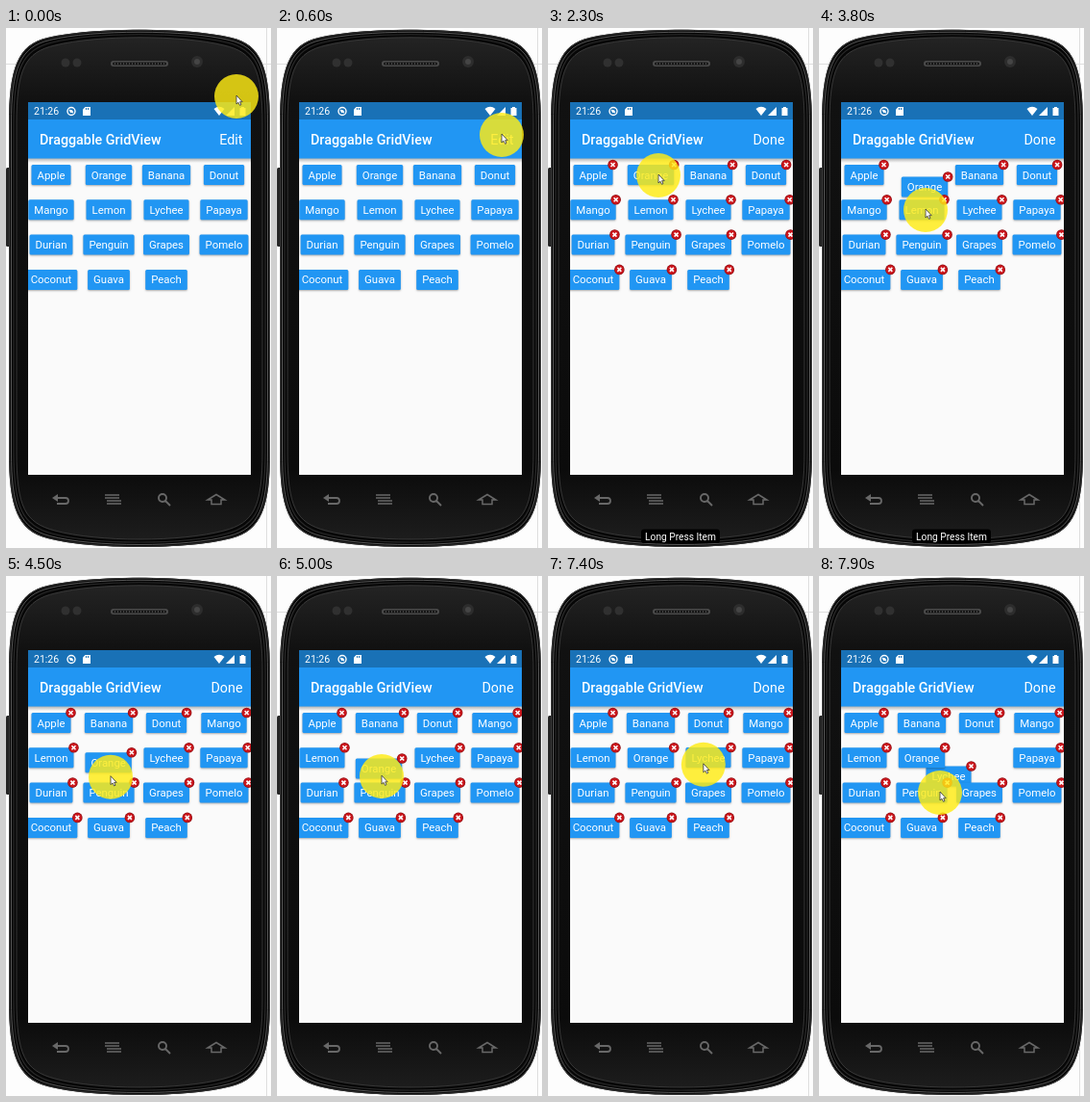
Recreate the animation shown at these times as an HTML page with a canvas. Size 276 by 540 pixels, loop 8 s.

```html
<!DOCTYPE html>
<html lang="en">
<head>
<meta charset="utf-8">
<title>Draggable GridView</title>
<style>
html, body { margin: 0; width: 100%; height: 100%; overflow: hidden; background: #fdfdfd; }
canvas { display: block; width: 276px; height: 540px; }
</style>
</head>
<body>
<canvas id="stage"></canvas>
<script>
const W = 276, H = 540, LOOP = 8000, STEP = 100;
const canvas = document.getElementById('stage');
const ctx = canvas.getContext('2d');
const dpr = window.devicePixelRatio || 1;
canvas.width = W * dpr;
canvas.height = H * dpr;

const BLUE = '#2196f3';
const fruits = ['Apple', 'Orange', 'Banana', 'Donut', 'Mango', 'Lemon', 'Lychee', 'Papaya',
  'Durian', 'Penguin', 'Grapes', 'Pomelo', 'Coconut', 'Guava', 'Peach'];
const reordered = fruits.filter(name => name !== 'Orange');
reordered.splice(5, 0, 'Orange');

// Motion paths: [time, x, y]
const pointerPath = [
  [0, 240, 71], [200, 205, 180], [300, 198, 207], [600, 234, 111], [1200, 234, 111],
  [1500, 193, 149], [2100, 173, 152], [2200, 113, 157], [2300, 115, 153], [3300, 115, 153],
  [3800, 111, 189], [4200, 109, 209], [5100, 109, 208], [5900, 169, 192], [6000, 171, 192],
  [6300, 153, 194], [6500, 153, 194], [6700, 169, 190], [7300, 169, 190], [7900, 126, 225]
];
const drags = [
  { name: 'Orange', from: 3400, to: 5200,
    path: [[3400, 107, 152.5], [3800, 110, 165], [4200, 107, 190], [5000, 106, 200]] },
  { name: 'Lychee', from: 7400, to: LOOP,
    path: [[7400, 167, 188.5], [7600, 158, 193], [7900, 135, 208]] }
];

function along(path, t) {
  const next = path.findIndex(key => key[0] > t);
  if (next === 0) return path[0].slice(1);
  if (next < 0) return path[path.length - 1].slice(1);
  const a = path[next - 1], b = path[next];
  const k = (t - a[0]) / (b[0] - a[0]);
  return [a[1] + (b[1] - a[1]) * k, a[2] + (b[2] - a[2]) * k];
}

function rect(x, y, w, h, fill, radius = 0) {
  ctx.fillStyle = fill;
  ctx.beginPath();
  ctx.roundRect(x, y, w, h, radius);
  ctx.fill();
}

function disc(x, y, r, fill) {
  ctx.fillStyle = fill;
  ctx.beginPath();
  ctx.arc(x, y, r, 0, Math.PI * 2);
  ctx.fill();
}

function shape(d, fill) {
  ctx.fillStyle = fill;
  ctx.fill(new Path2D(d));
}

function line(d, color, width) {
  ctx.strokeStyle = color;
  ctx.lineWidth = width;
  ctx.stroke(new Path2D(d));
}

function label(text, x, y, size, align = 'left', weight = 400) {
  ctx.font = `${weight} ${size}px Roboto, sans-serif`;
  ctx.textAlign = align;
  ctx.fillStyle = '#fff';
  ctx.fillText(text, x, y);
}

// Phone outline, drawn in by `inset` pixels
function outline(inset) {
  const l = 3 + inset, r = 275 - inset, t = 2 + inset, b = 539 - inset;
  return `M${l} 100C${l} 42 ${l + 9} ${t + 15} ${l + 40} ${t + 8}` +
    `C${l + 85} ${t - 3} ${r - 85} ${t - 3} ${r - 40} ${t + 8}` +
    `C${r - 9} ${t + 15} ${r} 42 ${r} 100V440` +
    `C${r} 498 ${r - 9} ${b - 17} ${r - 40} ${b - 9}` +
    `C${r - 85} ${b + 3} ${l + 85} ${b + 3} ${l + 40} ${b - 9}` +
    `C${l + 9} ${b - 17} ${l} 498 ${l} 440Z`;
}

function drawPhone() {
  rect(0, 0, W, H, '#fdfdfd');
  rect(0, 37, W, 1, '#dedede');
  rect(271, 0, 1, H, '#dedede');
  rect(0, 145, 5, 82, '#242424', 1.5);
  shape(outline(0), '#070707');
  line(outline(0.5), '#3c3c3c', 1);
  line(outline(2.5), '#777', 0.7);
  line(outline(5), '#292929', 1.2);
  const gloss = ctx.createLinearGradient(0, 8, 0, 532);
  gloss.addColorStop(0, '#242424');
  gloss.addColorStop(0.13, '#111');
  gloss.addColorStop(0.86, '#0b0b0b');
  gloss.addColorStop(1, '#1d1d1d');
  shape(outline(8), gloss);
  line(outline(8), '#484848', 0.7);

  rect(109, 34, 60, 6, '#4b4b4b', 3);
  rect(111, 35.5, 56, 3, '#171717', 1.5);
  for (let x = 113; x < 166; x += 3) rect(x, 36, 1, 2, '#444');
  disc(62, 36, 4.5, '#303030');
  disc(74, 36, 4.5, '#303030');
  disc(199, 35, 6, '#2d2d2d');
  disc(199, 35, 3, '#454545');

  const gray = '#686868';
  line('M52 488H62Q65 488 65 491T62 494H53', gray, 1.8);
  shape('M48 488L54 484V492Z', gray);
  line('M103 485H118M103 488H118M105 491H120M105 494H120', gray, 1.4);
  line('M167 488A4 4 0 1 1 159 488A4 4 0 1 1 167 488M166 491L171 496', gray, 1.9);
  line('M210 490L219 484.5L228 490H224V494.5H214V490Z', gray, 1.5);
}

function drawAppBar(editing) {
  rect(23, 77, 232, 387, '#fafafa');
  const shadow = ctx.createLinearGradient(0, 135, 0, 140);
  shadow.addColorStop(0, 'rgba(0,0,0,.3)');
  shadow.addColorStop(1, 'rgba(0,0,0,0)');
  rect(23, 135, 232, 5, shadow);
  rect(23, 77, 232, 18, '#1971b6');
  rect(23, 95, 232, 40.5, BLUE);

  label('21:26', 29, 90, 10.5);
  line('M72 86.5A4 4 0 1 1 64 86.5A4 4 0 1 1 72 86.5M66 85L70 88', '#fff', 1.4);
  disc(68, 86.5, 1.6, '#fff');
  shape('M82.5 82H88V91H80V84.5Z', '#fff');
  rect(83, 83, 1, 2, '#1971b6');
  rect(85, 83, 1, 2, '#1971b6');
  shape('M216.5 84Q222 79.5 227.5 84L222 91Z', '#fff');
  shape('M238 82V91H229Z', '#fff');
  shape('M243.5 83H245V82H248V83H249.5V91H243.5Z', '#fff');

  label('Draggable GridView', 35, 121, 14.3, 'left', 500);
  label(editing ? 'Done' : 'Edit', 246.5, 121, 14.3, 'right');
}

function drawBadge(x, y) {
  disc(x, y, 5.3, '#8f1116');
  disc(x, y, 4.6, '#cb161c');
  line(`M${x - 2} ${y - 2}l4 4m0 -4l-4 4`, '#fff', 1.6);
}

function drawItem(name, x, y, editing) {
  ctx.font = '400 11.4px Roboto, sans-serif';
  const width = ctx.measureText(name).width + 12;
  const left = x - width / 2, top = y - 10.5;
  ctx.save();
  ctx.shadowColor = 'rgba(0,0,0,.3)';
  ctx.shadowBlur = 2 * dpr;
  ctx.shadowOffsetY = dpr;
  rect(left, top, width, 21, BLUE, 1.5);
  ctx.restore();
  label(name, x, y + 4, 11.4, 'center');
  if (editing) drawBadge(left + width, top);
}

function drawGrid(t, editing) {
  const order = t < 4500 ? fruits : reordered;
  const drag = drags.find(d => t >= d.from && t < d.to);
  ctx.save();
  ctx.beginPath();
  ctx.rect(23, 135.5, 232, 328.5);
  ctx.clip();
  if (drag) drawItem(drag.name, ...along(drag.path, t), editing);
  order.forEach((name, i) => {
    if (drag && drag.name === name) return;
    drawItem(name, 47 + i % 4 * 60, 152.5 + Math.floor(i / 4) * 36.3, editing);
  });
  ctx.restore();
}

function drawPointer(t) {
  const [x, y] = along(pointerPath, t);
  disc(x, y, 23, 'rgba(255,236,20,.82)');
  ctx.save();
  ctx.translate(x, y);
  const arrow = 'M0 -1V8L2 6.3L3.5 9.3L5 8.6L3.6 5.7H6.2Z';
  shape(arrow, '#fff');
  line(arrow, '#333', 0.8);
  ctx.restore();
}

function draw() {
  const t = Math.floor(performance.now() % LOOP / STEP) * STEP;
  const editing = t >= 1300;
  ctx.setTransform(dpr, 0, 0, dpr, 0, 0);
  drawPhone();
  drawAppBar(editing);
  drawGrid(t, editing);
  if (t >= 1800 && t < 4500) {
    rect(97, 520.5, 82, 14.5, '#000', 3);
    label('Long Press Item', 138, 531.5, 10.2, 'center');
  }
  drawPointer(t);
  requestAnimationFrame(draw);
}
draw();
</script>
</body>
</html>
```
